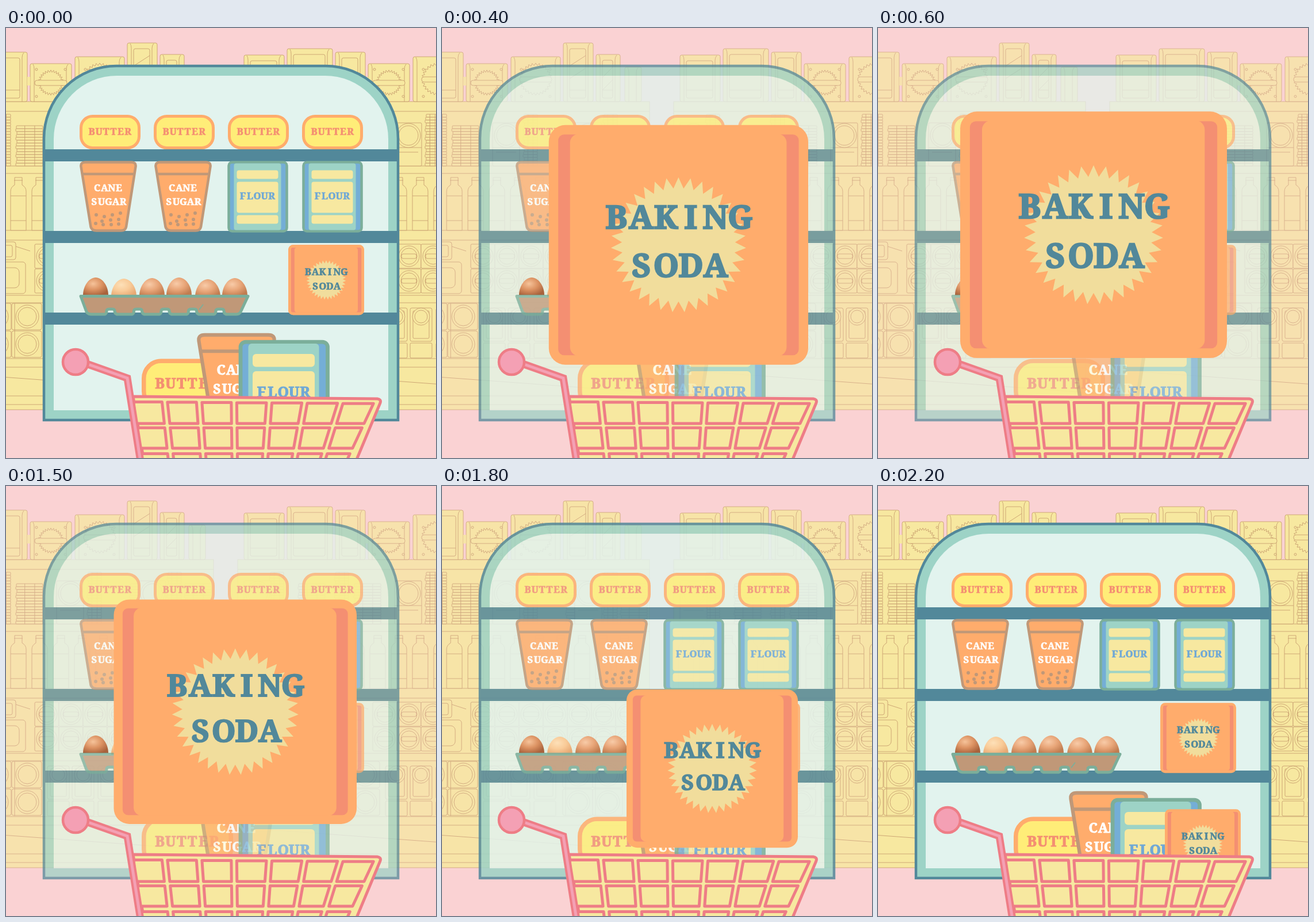
Animation, 748 px wide and 748 px high, one loop 2400 ms. Source, as an HTML page:

```html
<!DOCTYPE html>
<html lang="en">
<head>
<meta charset="utf-8">
<title>Baking shelf</title>
<style>
  html, body { margin: 0; width: 100%; height: 100%; overflow: hidden; background: #fad2d3; }
  svg { display: block; width: 100%; height: 100%; }
  text { font: 700 16.6px "Noto Serif", "Liberation Serif", serif; text-anchor: middle; stroke-width: .7; }
  .fade { opacity: var(--fade, 1); }
  .back { fill: #f7e8a0; stroke: #c9a070; stroke-width: .9; }
</style>
</head>
<body>
<svg id="stage" viewBox="0 0 748 748"></svg>
<script>
const yellow = '#f7e8a0', teal = '#9dd3c6', navy = '#52889a', orange = '#ffac6c',
      salmon = '#f48f72', brown = '#c09878', green = '#7bae9a', blue = '#74aed6',
      rose = '#ee7d86', pink = '#f4a0b4';

const range = n => [...Array(n).keys()];
const each = (list, fn) => list.map(fn).join('');
const rect = (x, y, w, h, r = 0, attrs = '') =>
  `<rect x="${x}" y="${y}" width="${w}" height="${h}" rx="${r}" ${attrs}/>`;
const circle = (x, y, r, attrs = '') => `<circle cx="${x}" cy="${y}" r="${r}" ${attrs}/>`;
const path = (d, attrs = '') => `<path d="${d}" ${attrs}/>`;
const fill = c => `fill="${c}"`;
const outline = (f, s, w, join = 'round') =>
  `fill="${f}" stroke="${s}" stroke-width="${w}" stroke-linejoin="${join}"`;
const place = (item, x, y, s = 1) =>
  `<g class="fade" transform="translate(${x} ${y}) scale(${s})">${item}</g>`;

// typewriter spacing: every letter centred on an even pitch
function label(word, x, y, color) {
  const xs = [...word].map((_, i) => (x + (i - (word.length - 1) / 2) * 12.6).toFixed(1));
  return `<text x="${xs.join(' ')}" y="${y}" fill="${color}" stroke="${color}">${word}</text>`;
}

function burst(x, y, outer, inner, spikes, attrs = '') {
  const pts = range(spikes * 2).map(i => {
    const a = i * Math.PI / spikes, r = i % 2 ? inner : outer;
    return (x + r * Math.sin(a)).toFixed(2) + ',' + (y - r * Math.cos(a)).toFixed(2);
  });
  return `<polygon points="${pts.join(' ')}" ${attrs}/>`;
}

// ---- line-drawn shelves at the back ----
function carton(x, y, w) {
  const h = 128 - y;
  return rect(x, y, w, h, 3) + path(`M${x + w - 6} ${y + 1}q-3 3 -3 8V128M${x + 5} ${y + 1}q2 3 2 8V128`);
}
const panel = (x, y, w) =>
  carton(x, y, w) + rect(x + 11, y + 10, w - 24, 112 - y, 3) + path(`M${x + 11} 108h${w - 24}`);
const burstBox = (x, y, w, r) => {
  const cx = x + w / 2, cy = (y + 128) / 2;
  return carton(x, y, w) + burst(cx, cy, r, r - 4, 28) + rect(cx - 28, cy - 4, 56, 9, 4) +
    each([-1, 1], d => circle(cx + d * 25, 72, 2) + circle(cx + d * 25, 119, 2));
};
const tower = (x, y, w) =>
  panel(x, y, w) + path(`M${x + 11} ${y + 40}L${x + w - 13} ${y + 22}M${x + 11} ${y + 62}L${x + w - 13} ${y + 44}`);
const stack = (x, y, w) => each(range(Math.floor((240 - y) / 5)), i =>
  rect(x + (i % 3), 235 - i * 5, w - (i % 3), 5, 1)) + path(`M${x + w / 3} ${y}V240M${x + w * .7} ${y}V240`);
const bottle = x => path(`M${x} 352V284q0 -7 7 -11V260h13v13q7 4 7 11V352Z`) +
  path(`M${x} 292h27M${x} 335h27M${x + 6} 265h15`);
const disc = (x, y, r) => circle(x, y, r) + circle(x, y, r - 4);

const backShelf = rect(-185, 128, 546, 536) +
  panel(-174, 47, 70) + panel(-99, 36, 79) + panel(-15, 42, 52) + burstBox(42, 62, 72, 22) +
  burstBox(120, 50, 86, 28) + tower(211, 26, 52) + tower(268, 46, 42) + carton(318, 68, 29) +
  rect(37, 85, 5, 15, 0, 'stroke="none"') +
  each([145, 240, 253, 352, 369, 465, 478, 590, 655], y => path(`M-185 ${y}H361`)) +
  each([-130, -17, 141, 280], x => stack(x, 150, 25)) +
  each([-80, 17, 215, 310], x => stack(x, 170, 47)) +
  each([-150, 112, 255], x => rect(x - 24, 165, 47, 75, 2) + path(`M${x - 24} 208h47M${x - 18} 216h35`) + disc(x, 187, 21)) +
  each(range(14), i => bottle(8 + 37 * (i - 5))) +
  rect(-30, 372, 47, 31, 4) + rect(-24, 378, 35, 20, 3) +
  rect(-30, 407, 64, 55, 5) + rect(-23, 417, 46, 35, 8) + path('M17 380L42 388') +
  each(range(7), i => each([397, 440], y => rect(50 + 42 * i, y - 21, 42, 42, 2) +
    disc(71 + 42 * i, y, 18) + rect(58 + 42 * i, y - 4, 26, 8, 3))) +
  each([-95, -43, 10, 210, 262], x => each([502, 550], y => rect(x, y - 23, 52, 46, 3) + disc(x + 27, y, 20)) +
    path(`M${x + 5} 479v95`)) +
  each([72, 115, 160], x => rect(x, 487, 38, 58, 3) + rect(x + 5, 492, 28, 48, 2) + disc(x + 19, 502, 15) +
    rect(x, 548, 38, 26, 2)) +
  path('M-185 575H361M-185 594L361 634M-185 640H361', 'fill="none"');

// ---- groceries, each in its own coordinates ----
const butter = rect(2.5, 2.5, 101, 55, 20, outline('#ffed78', orange, 5)) + label('BUTTER', 52.5, 34.5, salmon);

const dots = [[29, 94], [43, 97], [57, 94], [71, 91], [39, 105], [54, 103], [68, 102], [28, 109], [41, 111], [55, 111], [68, 110]];
const sugar = path('M10 2.5H90Q98.5 2.5 97.5 10L81 115Q79.5 121.5 72 121.5H29Q21.5 121.5 19.5 115L2.5 10Q1.5 2.5 10 2.5Z',
    outline(orange, brown, 4.5)) + path('M5 23H95', `stroke="${brown}" stroke-width="4.5"`) +
  label('CANE', 49.5, 52.5, '#fff') + label('SUGAR', 50.5, 76.7, '#fff') +
  each(dots, ([x, y]) => circle(x, y, 3, fill(brown)));

const flour = rect(2, 2, 101, 120, 6, outline(blue, green, 4.5)) +
  rect(11, 4, 82, 116, 4, fill(teal)) +
  each([[16, 15], [36, 54], [94, 15]], ([y, h]) => rect(16, y, 72, h, 4, fill(yellow))) +
  label('FLOUR', 51.5, 66.3, '#6fa8d6');

const soda = rect(0, 0, 132, 122, 8.4, fill(orange)) +
  rect(4.8, 4.8, 122.4, 112.4, 3, fill(salmon)) + rect(10.8, 4.5, 110.2, 113, 4.5, fill(orange)) +
  burst(66, 61, 34.4, 28.8, 35, fill('#f1dd9c')) +
  label('BAKING', 65.9, 52.7, navy) + label('SODA', 66, 77.4, navy);

const egg = (x, top, tone) =>
  path(`M${x - 22} ${top + 31}C${x - 22} ${top + 14} ${x - 11} ${top} ${x} ${top}S${x + 22} ${top + 14} ${x + 22} ${top + 31}Z`,
    fill(`url(#${tone})`));
const eggs = egg(156, 434, 'dark') + egg(205, 436, 'pale') + egg(254, 435, 'mid') +
  egg(301, 434, 'mid') + egg(351, 437, 'mid') + egg(398, 435, 'mid');
const notch = i => `H${172 + i * 47.5}q3 -1 3 -6q0 -3 5 -3h5q4 0 4 3q0 5 4 6`;
const tray = path(`M130 466.5L139 491Q141 498 148 498${each(range(5), notch)}H400Q407 498 409 492L421 466.5Z`,
    outline(brown, green, 5)) +
  path('M336 490L343 481', `stroke="${green}" stroke-width="2"`);

const arch = (x, y, size, r) =>
  `M${x} ${y + size}V${y + r}a${r} ${r} 0 0 1 ${r} ${-r}H${x + size - r}a${r} ${r} 0 0 1 ${r} ${r}V${y + size}Z`;
const fridge = path(arch(66, 66, 616, 126), outline(teal, navy, 4.5, 'miter')) +
  path(arch(83, 83, 582, 110), fill('#e2f3ee')) +
  each([211, 353, 495], y => rect(64, y, 620, 21, 0, fill(navy)));

// ---- trolley: bars lean more and more towards the right ----
const barX = (i, y) => 216.5 + 59 * i + .32 * i * i + (y - 650) * (.12 - .012 * i * i);
function cell(i, row) {
  const top = 650.5 + 45 * row + (row ? 0 : i * .45), bottom = 688 + 43 * row;
  const p = (u, y, d) => (barX(u, y) + d).toFixed(1) + ' ' + y.toFixed(1);
  return path(`M${p(i, top, 5)}L${p(i + 1, top, -4.5)}L${p(i + 1, bottom, -4.5)}L${p(i, bottom, 5)}Z`,
    outline(yellow, rose, 5));
}
const handle = (c, w) => path('M140 584L211 609L235 760', `fill="none" stroke="${c}" stroke-width="${w}"`);
const cart = path('M221 641L646 645Q653 646 651 652L606 760H241Z', outline(yellow, rose, 5)) +
  each(range(3), row => each(range(7), i => cell(i, row))) +
  handle(rose, 13) + handle(pink, 5) + circle(121, 581, 22, outline(pink, rose, 4.5));

const gradient = (id, a, b, c) => `<radialGradient id="${id}" cx=".4" cy=".35" r=".7">
  <stop offset="0" stop-color="${a}"/><stop offset=".5" stop-color="${b}"/><stop offset="1" stop-color="${c}"/></radialGradient>`;

const stage = document.getElementById('stage');
stage.innerHTML = `<defs>${gradient('dark', '#f6c39a', '#dc9262', '#a8623c')}
  ${gradient('mid', '#f8cba8', '#e8a578', '#c07c50')}${gradient('pale', '#fde0b8', '#f9cb98', '#e6a873')}</defs>` +
  rect(0, 0, 748, 748, 0, fill('#fad2d3')) +
  each([0, 588], x => `<g class="back fade" transform="translate(${x})">${backShelf}</g>`) +
  place(fridge, 0, 0) +
  each(range(4), i => place(butter, 128 + 129 * i, 151)) +
  place(sugar, 128, 231) + place(sugar, 258, 231) +
  place(flour, 385.5, 231.5) + place(flour, 515.5, 231.5) +
  eggs + place(tray, 0, 0) + place(soda, 491, 377.3) +
  place(butter, 236, 575.5, 1.5) + place(sugar, 332, 530.5, 1.38) + place(flour, 405, 543, 1.5) +
  `<g id="flyer">${soda}</g>` + cart;
const flyer = document.getElementById('flyer');

// ---- motion: ten steps a second ----
const mix = (a, b, q) => a.map((v, i) => v + (b[i] - v) * q);
// centre x, centre y, width, opacity of the scenery
const onShelf = [557, 438.3, 132, 1], popped = [375, 362, 531, .7],
      shown = [375, 359.7, 464, .7], inCart = [565, 623.3, 132, 1];

function pose(step) {
  if (step < 6) return mix(onShelf, popped, step / 5);
  if (step < 15) return shown;
  return mix(shown, inCart, Math.min(1, (step - 14) / 8));
}

const start = performance.now();
function draw(now) {
  const step = Math.floor(Math.max(0, now - start) % 2400 / 100);
  const [x, y, w, fade] = pose(step), s = w / 132;
  stage.style.setProperty('--fade', fade);
  flyer.setAttribute('transform', `translate(${x - 66 * s} ${y - 61 * s}) scale(${s})`);
  requestAnimationFrame(draw);
}
draw(start);
</script>
</body>
</html>
```
